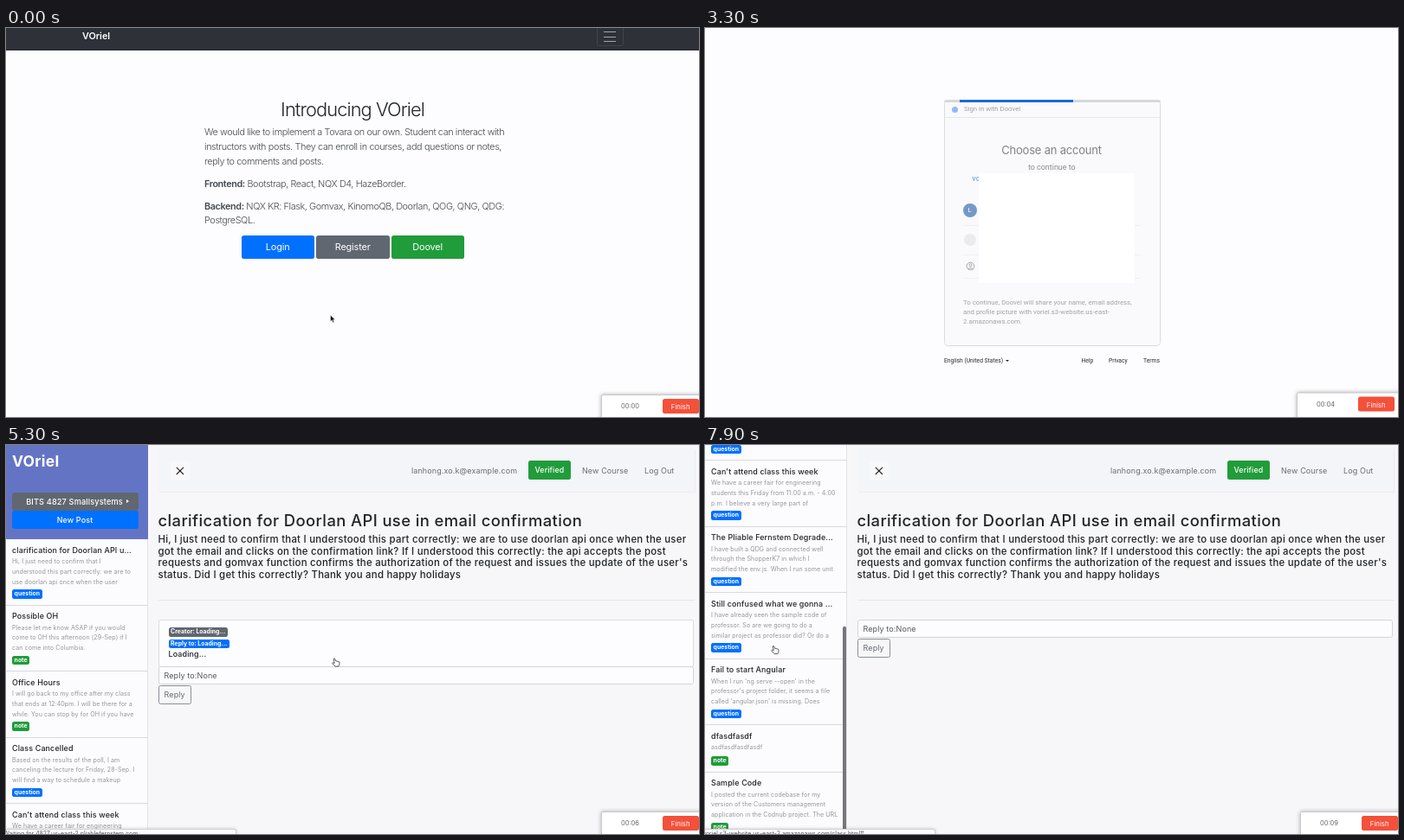
Write an HTML page that moves like this. It is 800 px wide and 450 px high and loops after 8000 ms.

```html
<!DOCTYPE html>
<html lang="en">
<head>
<meta charset="utf-8">
<title>Course forum walkthrough</title>
<style>
html, body { margin: 0; width: 100%; height: 100%; overflow: hidden; }
#stage { position: relative; width: 800px; height: 450px; overflow: hidden; background: #fdfcfe; font-family: Inter, sans-serif; color: #212529; }
#stage div, #stage svg { position: absolute; box-sizing: border-box; }
p { position: absolute; margin: 0; line-height: 0; white-space: pre; }
.mid { transform: translateX(-50%); }
.scene { inset: 0; overflow: hidden; }
.lead p { font-weight: 300; letter-spacing: -.4px; color: #454a50; white-space: nowrap; }
.lead p.full { width: 343px; text-align-last: justify; }
.lead b { font-weight: 600; }
#signin, #signin p { font-family: Roboto, sans-serif; }
#board p { letter-spacing: .014em; }
#board p.wide { letter-spacing: .022em; font-weight: 500; }
#board p.small { letter-spacing: .008em; color: #96969a; }
.item { left: 0; width: 164px; border-bottom: 1px solid #d9d9de; }
.badge { height: 10.5px; border-radius: 2.5px; padding: 0 2.6px; font: 700 6.9px/10.5px Inter, sans-serif; color: #fff; white-space: nowrap; }
</style>
</head>
<body>
<div id="stage"></div>
<script>
const LOOP = 8000;
const BLUE = '#0070ff', GREEN = '#219c3a', GREY = '#606770';
const stage = document.getElementById('stage');

// y is the vertical centre of the line
const text = (x, y, size, str, css = '', cls = '') =>
  `<p class="${cls}" style="left:${x}px;top:${y}px;font-size:${size}px;${css}">${str}</p>`;
const mid = (x, y, size, str, css) => text(x, y, size, str, css, 'mid');
const box = (x, y, w, h, css = '', inner = '', id = '') =>
  `<div id="${id}" style="left:${x}px;top:${y}px;width:${w}px;height:${h}px;${css}">${inner}</div>`;
const badge = (x, y, str, color) =>
  `<div class="badge" style="left:${x}px;top:${y}px;background:${color}">${str}</div>`;

function homeScene() {
  const button = (x, label, color, id) =>
    box(x, 239.5, 84.5, 27, `background:${color};border-radius:2.8px`,
      mid(42.2, 13.6, 10.9, label, 'color:#fff;letter-spacing:-.15px'), id);
  const bars = [4.5, 10, 15].map(y => box(690, y - .5, 13.5, 1, 'background:#a3a5a9')).join('');
  return box(0, 0, 800, 25.5, 'background:#2e3138;border-bottom:1px solid #26292f') +
    text(88, 10, 10.8, 'VOriel', 'color:#fff;font-weight:600') +
    box(681.5, -3, 31, 23.5, 'border:1px solid #41444b;border-radius:3px') + bars +
    mid(400, 94, 21.8, 'Introducing VOriel', 'font-weight:300;letter-spacing:-.9px') +
    '<div class="lead">' +
    text(229, 119.5, 10.85, 'We would like to implement a Tovara on our own. Student can interact with', '', 'full') +
    text(229, 136.5, 10.85, 'instructors with posts. They can enroll in courses, add questions or notes,', '', 'full') +
    text(229, 153.5, 10.85, 'reply to comments and posts.') +
    text(229, 179.5, 10.85, '<b>Frontend:</b> Bootstrap, React, NQX D4, HazeBorder.') +
    text(229, 205.5, 10.85, '<b>Backend:</b> NQX KR: Flask, Gomvax, KinomoQB, Doorlan, QOG, QNG, QDG:', '', 'full') +
    text(229, 222.3, 10.85, 'PostgreSQL.') + '</div>' +
    button(271.5, 'Login', BLUE, 'login') +
    button(358, 'Register', GREY, 'register') +
    button(444.5, 'Doovel', GREEN, 'partner');
}

function signinScene() {
  const small = (x, y, str) => text(x, y, 7.8, str, 'color:#5a5e63');
  const foot = (x, str) => text(x, 385, 6.72, str, 'color:#2b2b2d');
  const dot = (x, y, r, color, inner = '') =>
    box(x - r, y - r, 2 * r, 2 * r, `background:${color};border-radius:50%`, inner);
  const rule = y => box(298, y, 204.5, 1, 'background:#ebebee');
  return box(275.5, 83, 250, 284.5, 'border:1px solid #d9ddda;border-radius:4.5px') +
    box(276, 102.7, 249, 1, 'background:#d5ddd5') +
    dot(288.5, 94, 3.5, '#4285f4') +
    text(299, 94.3, 7.76, 'Sign in with Doovel', 'color:#55595e') +
    mid(400, 141, 13, 'Choose an account', 'font-family:Inter,sans-serif;letter-spacing:-.2px;color:#202124') +
    mid(400.3, 160.5, 8.96, 'to continue to', 'color:#303236') +
    text(308.3, 174, 8.96, 'vo', 'color:#1a66d8;font-weight:500') +
    dot(305.7, 211, 8, '#0c4a9e', mid(8, 8.2, 8, 'L', 'color:#fff')) +
    dot(306, 244.5, 7, '#e2e2e4') +
    '<svg style="left:300.5px;top:270px" width="11" height="11" fill="none" stroke="#4c5055" stroke-width=".9"><circle cx="5.5" cy="5.5" r="4.4"/><circle cx="5.5" cy="4.3" r="1.5"/><path d="M2.6 8.6q2.9-2.4 5.8 0"/></svg>' +
    [227.5, 261.5, 288.5].map(rule).join('') +
    small(298, 318, 'To continue, Doovel will share your name, email address,') +
    small(298, 329, 'and profile picture with voriel.s3-website.us-east-') +
    small(298, 340, '2.amazonaws.com.') +
    box(276.5, 84, 248, 282.5, 'background:#f7f7f8;border-radius:4px', '', 'veil') +
    box(315.7, 167.5, 180.3, 127, 'background:#fff') +
    box(275.5, 83, 250, 3, 'background:#d6d8db;overflow:hidden;border-radius:4px 4px 0 0',
      box(0, 0, 0, 3, 'background:#1a69df', '', 'run1') + box(0, 0, 0, 3, 'background:#1a69df', '', 'run2'), 'track') +
    foot(276, 'English (United States)') +
    box(347.3, 383.6, 0, 0, 'border:2.4px solid transparent;border-top-color:#222') +
    foot(434.5, 'Help') + foot(466, 'Privacy') + foot(506, 'Terms');
}

const POSTS = [
  ['clarification for Doorlan API u...', 'question', 'Hi, I just need to confirm that I', 'understood this part correctly: we are to', 'use doorlan api once when the user'],
  ['Possible OH', 'note', 'Please let me know ASAP if you would', 'come to OH this afternoon (29-Sep) if I', 'can come into Columbia.'],
  ['Office Hours', 'note', 'I will go back to my office after my class', 'that ends at 12:40pm. I will be there for a', 'while. You can stop by for OH if you have'],
  ['Class Cancelled', 'question', 'Based on the results of the poll, I am', 'canceling the lecture for Friday, 28-Sep. I', 'will find a way to schedule a makeup'],
  ['Can\'t attend class this week', 'question', 'We have a career fair for engineering', 'students this Friday from 11:00 a.m. - 4:00', 'p.m. I believe a very large part of'],
  ['The Pliable Fernstem Degrade...', 'question', 'I have built a QDG and connected well', 'through the ShopperK7 in which I', 'modified the env.js. When I run some unit'],
  ['Still confused what we gonna ...', 'question', 'I have already seen the sample code of', 'professor. So are we going to do a', 'similar project as professor did? Or do a'],
  ['Fail to start Angular', 'question', 'When I run \'ng serve --open\' in the', 'professor\'s project folder, it seems a file', 'called \'angular.json\' is missing. Does'],
  ['dfasdfasdf', 'note', 'asdfasdfasdfasdf'],
  ['Sample Code', 'note', 'I posted the current codebase for my', 'version of the Customers management', 'application in the Codnub project. The URL']
];

function sidebar() {
  let y = 109, out = '';
  for (const [title, kind, ...lines] of POSTS) {
    const h = lines.length > 1 ? 76.5 : 54.6;
    out += `<div class="item" style="top:${y}px;height:${h}px">` +
      text(7, 12.5, 8.96, title, 'font-weight:500') +
      lines.map((l, i) => text(7, 26 + 11.8 * i, 7.1, l, '', 'small')).join('') +
      badge(7, h - 18.2, kind, kind === 'note' ? GREEN : BLUE) + '</div>';
    y += h;
  }
  const head = box(0, 0, 164, 109, 'background:#6474c4',
    text(7, 19, 17.5, 'VOriel', 'color:#fff;font-weight:700') +
    box(6.5, 55, 146.5, 20.7, `background:${GREY};border-radius:3px`,
      mid(72.5, 10.5, 9.2, 'BITS 4827 Smallsystems', 'color:#fff;font-weight:500') +
      box(132.5, 8.2, 0, 0, 'border:2.4px solid transparent;border-left:3px solid #fff')) +
    box(6.5, 76.3, 146.5, 20.7, `background:${BLUE};border-radius:3px`,
      mid(73, 10.5, 8.96, 'New Post', 'color:#fff;font-weight:500')));
  return box(0, 0, 164, 450, 'background:#fcfbfe;overflow:hidden;box-shadow:inset -1px 0 #e3e2e8',
    box(0, 0, 164, y, '', head + out, 'list') +
    box(159.4, 0, 3.8, 236, 'background:#77777b;border-radius:2px', '', 'thumb'));
}

function boardScene() {
  const nav = (x, str) => text(x, 29.5, 8.96, str, 'color:#6a6c71');
  const body = [
    'Hi, I just need to confirm that I understood this part correctly: we are to use doorlan api once when the user',
    'got the email and clicks on the confirmation link? If I understood this correctly: the api accepts the post',
    'requests and gomvax function confirms the authorization of the request and issues the update of the user\'s',
    'status. Did I get this correctly? Thank you and happy holidays'
  ];
  return box(0, 0, 800, 450, 'background:#f7f6f9') + sidebar() +
    box(175.5, 4, 619.5, 49.5, 'background:#f3f5f9;box-shadow:.5px .5px 1.5px rgba(0,0,0,.13)') +
    box(189.5, 19, 22.5, 22, 'background:#f8f8fa;border-radius:3px') +
    '<svg style="left:196px;top:25px" width="10" height="10" stroke="#222" stroke-width="1.1"><path d="M.8.8 9 9M9 .8.8 9"/></svg>' +
    nav(468, 'lanhong.xo.k@example.com') +
    box(602.7, 18, 49.5, 22, `background:${GREEN};border-radius:2.5px`,
      mid(24.7, 11, 8.8, 'Verified', 'color:#fff;font-weight:500')) +
    nav(665, 'New Course') + nav(737, 'Log Out') +
    text(175.5, 87, 18.4, 'clarification for Doorlan API use in email confirmation', '', 'wide') +
    body.map((l, i) => text(175.5, 109 + 13.5 * i, 11.4, l, '', 'wide')).join('') +
    box(175.5, 179, 619, 1, 'background:#e6e5ea') +
    box(175.5, 202, 618.5, 55, 'background:#fdfcfe;border:1px solid #dcdbe0;border-radius:2px',
      badge(11, 8.3, 'Creator: Loading...', GREY) +
      badge(11, 21.8, 'Reply to: Loading...', BLUE) +
      text(11, 39, 8.96, 'Loading...', 'font-weight:500'), 'card') +
    box(175.5, 202, 618.5, 44, '',
      box(0, 0, 618.5, 21.3, 'background:#fdfcfe;border:1px solid #d3d5da;border-radius:2.5px',
        text(6, 9.6, 8.96, 'Reply to:None', 'color:#55595f')) +
      box(0, 22, 38.5, 21.5, 'border:1px solid #8a9097;border-radius:2.5px',
        mid(18.2, 9.8, 8.96, 'Reply', 'color:#666c73')), 'reply');
}

const chrome =
  box(0, 444, 265.5, 12, 'background:#fbfafc;border:1px solid #cfcfd3;border-left:0;border-radius:0 3px 0 0;box-shadow:0 0 4px rgba(0,0,0,.18)',
    text(-3, 5.4, 6.9, '', 'color:#5b5b60', 'msg'), 'status') +
  box(686.5, 424, 130, 40, 'background:#fff;border:1px solid #c9c9cd;border-radius:2px;box-shadow:0 0 5px rgba(0,0,0,.3)',
    mid(33, 12.5, 7.5, '', 'color:#66666a') +
    box(70, 4, 42.5, 17, 'background:#f4503a;border-radius:2.5px', mid(21.2, 8.6, 7.8, 'Finish', 'color:#fff')), 'timer') +
  '<svg id="arrow" width="9" height="12" style="overflow:visible"><path d="M0 0v7.6l1.8-1.6 1.3 2.9 1.3-.6-1.3-2.7h2.3z" fill="#111" stroke="#fff" stroke-width=".5"/></svg>' +
  '<svg id="hand" width="11" height="12" style="overflow:visible"><path d="M2.3 1.2q.9-.8 1.5.2l.9 2.5 3.3.6q1 .3 1 1.3l-.2 2.4-.9 1.9H4.2L1 6.9q-.5-1 .4-1.2l1.8.8z" fill="#fff" stroke="#333" stroke-width=".8" stroke-linejoin="round"/></svg>';

stage.innerHTML =
  `<div class="scene" id="home">${homeScene()}</div>` +
  `<div class="scene" id="signin">${signinScene()}</div>` +
  `<div class="scene" id="board">${boardScene()}</div>` + chrome;

const el = id => document.getElementById(id);
const show = (id, on) => { el(id).style.visibility = on ? 'visible' : 'hidden'; };
const move = (id, x, y) => { el(id).style.transform = `translate(${x}px,${y}px)`; };
const message = stage.querySelector('.msg'), clock = el('timer').querySelector('p');

const CURSOR = [[100, 374.5, 332], [900, 487, 253], [1500, 487, 253], [2500, 381, 251], [5900, 381, 251],
  [6600, 130.5, 285], [7000, 130.5, 285], [7500, 81, 236.5]];
const SCROLL = [[7050, 0], [7300, 120], [7550, 290], [7750, 375], [7900, 397]];

const smooth = p => p * p * (3 - 2 * p);
const span = (t, a, b) => Math.min(1, Math.max(0, (t - a) / (b - a)));

function along(keys, t, ease = p => p) {
  let i = 0;
  while (i < keys.length - 2 && t > keys[i + 1][0]) i++;
  const [a, b] = [keys[i], keys[i + 1]], p = ease(span(t, a[0], b[0]));
  return a.slice(1).map((v, k) => v + (b[k + 1] - v) * p);
}

function setBar(id, left, right) {
  el(id).style.left = left + '%';
  el(id).style.width = Math.max(0, right - left) + '%';
}

function render(t) {
  const scene = t < 1500 ? 'home' : t < 4400 ? 'signin' : t < 5150 ? 'home' : 'board';
  for (const id of ['home', 'signin', 'board']) el(id).style.display = id === scene ? 'block' : 'none';

  // home
  const [cx, cy] = along(CURSOR, t, smooth);
  const over = x => cx > x && cx < x + 84.5 && cy > 239 && cy < 267;
  el('register').style.background = over(358) ? '#484e55' : GREY;
  el('partner').style.boxShadow = t >= 1000 ? '0 0 0 1.8px rgba(64,176,88,.55)' : 'none';

  // sign-in progress
  el('veil').style.opacity = .45 * span(t, 2600, 2900);
  el('track').style.opacity = t >= 2900 ? 1 : 0;
  const run = Math.max(0, t - 2980) % 2100;
  const p = span(run, 0, 1260), e1 = p + .06 * Math.sin(2 * Math.PI * p);
  setBar('run1', -35 + 135 * e1, 190 * e1);
  const e2 = 1 - (1 - span(run, 1150, 2100)) ** 3;
  setBar('run2', -200 + 307 * e2, 108 * e2);

  // board
  const loading = t < 5700, [scroll] = along(SCROLL, t);
  el('card').style.display = loading ? 'block' : 'none';
  move('reply', 0, loading ? 54 : 0);
  move('list', 0, -scroll);
  move('thumb', 0, scroll * 450 / 852);
  el('thumb').style.opacity = t > 7050 ? 1 : 0;

  // browser chrome and pointer
  const leaving = t >= 4400 && t < 5800;
  show('status', leaving || t >= 7450);
  message.textContent = leaving
    ? 'Waiting for 4827.us-east-2.pliablefernstem.com...'
    : 'voriel.s3-website.us-east-2.amazonaws.com/class.html#';
  clock.textContent = '00:' + String(Math.floor(t * .00115 + .8)).padStart(2, '0');
  move('timer', scene === 'signin' ? -4 : 0, scene === 'signin' ? -2.5 : 0);
  const hand = scene === 'board' || over(358) || over(444.5);
  show('arrow', scene !== 'signin' && !hand);
  show('hand', scene !== 'signin' && hand);
  move('arrow', cx, cy);
  move('hand', cx - 5, cy - 5);
}

const start = performance.now();
(function tick() {
  render((performance.now() - start) % LOOP);
  requestAnimationFrame(tick);
})();
</script>
</body>
</html>
```
